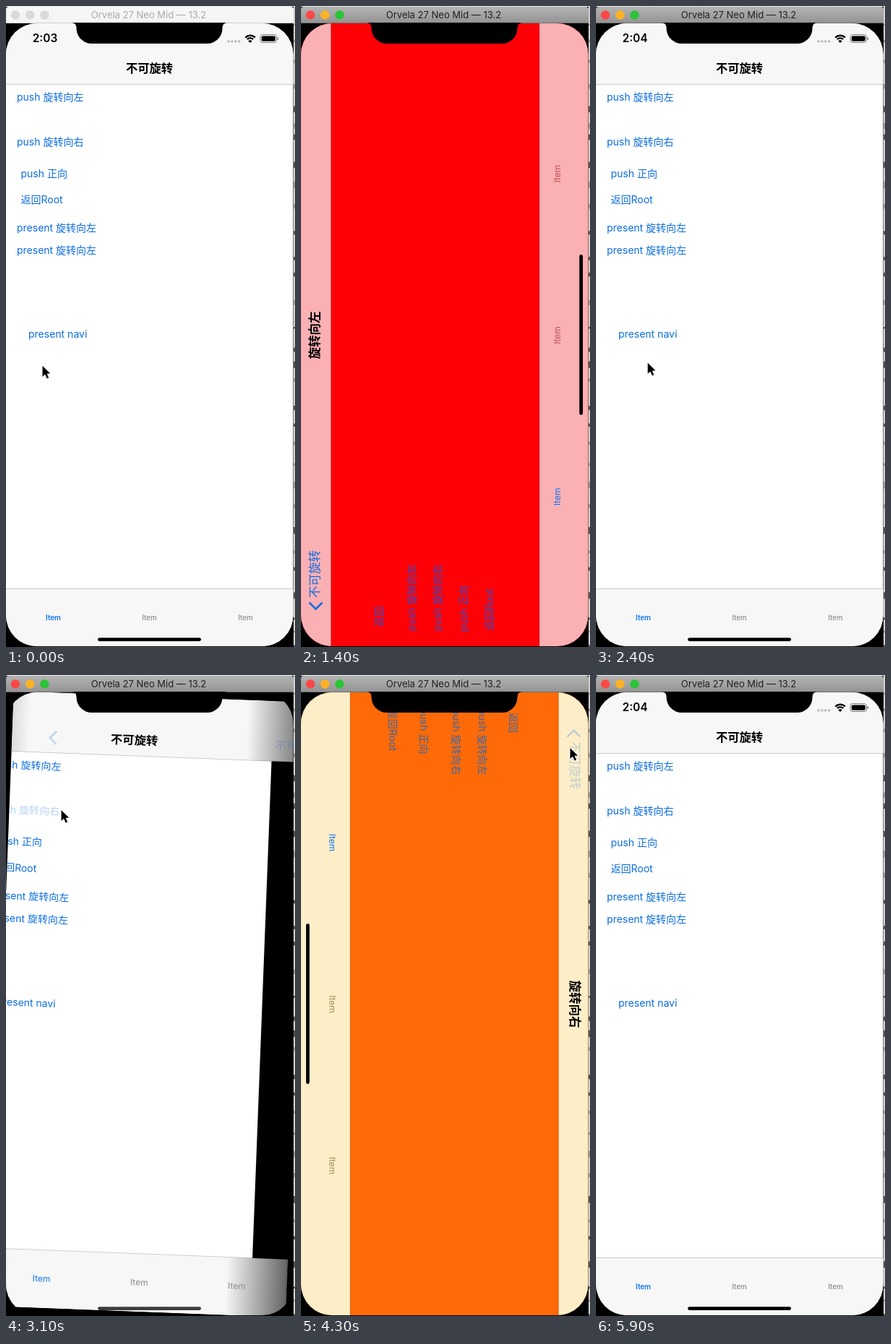
Write an HTML page with a canvas that moves like this. It is 400 px wide and 887 px high and loops after 6000 ms.

```html
<!DOCTYPE html>
<html lang="zh">
<head>
<meta charset="utf-8">
<title>Rotation demo</title>
<style>
html, body { margin: 0; width: 100%; height: 100%; overflow: hidden; background: #000; }
canvas { display: block; width: 400px; height: 887px; }
</style>
</head>
<body>
<canvas id="stage"></canvas>
<script>
const canvas = document.getElementById('stage');
const ctx = canvas.getContext('2d');
const dpr = window.devicePixelRatio || 1;
canvas.width = 400 * dpr;
canvas.height = 887 * dpr;

const LOOP = 6000, STEP = 100;
const SHORT = 398, LONG = 863, CX = 199, CY = 455.5;
const FONT = 'Inter, "Noto Sans CJK SC", "Noto Sans CJK", sans-serif';
const BLUE = '#0b6de2', LIGHT_BAR = '#f7f7f7';

const clamp = v => Math.max(0, Math.min(1, v));
const lerp = (a, b, k) => a + (b - a) * k;
const easeInOut = u => (1 - Math.cos(Math.PI * u)) / 2;
const easeOut = u => 1 - (1 - u) ** 1.5;

// Link entries: label, x from the left edge, y from the top edge
const rootLinks = [
  ['push 旋转向左', 15, 103], ['push 旋转向右', 15, 165],
  ['push 正向', 20.5, 208.5], ['返回Root', 20.5, 245],
  ['present 旋转向左', 15, 284], ['present 旋转向左', 15, 315],
  ['present navi', 31, 431]
];
const leftPage = {
  dir: -1, fill: '#fe0006', bar: '#fbb0b4', muted: '#bb5258', link: '#3a4cc4',
  title: '旋转向左',
  links: [['返回', 28, 109], ['push 旋转向左', 22, 154], ['push 旋转向右', 22, 190],
    ['push 正向', 21, 226], ['返回Root', 23, 262]]
};
const rightPage = {
  dir: 1, fill: '#ff6a08', bar: '#fdeec8', muted: '#a48a56', link: '#3d68a4',
  title: '旋转向右',
  links: [['返回', 28, 105], ['push 旋转向左', 22, 148], ['push 旋转向右', 22, 184],
    ['push 正向', 21, 229], ['返回Root', 23, 272]]
};

const visits = [
  { page: leftPage, link: 0, press: 600, push: 760, backPress: 1800, pop: 2000 },
  { page: rightPage, link: 1, press: 2900, push: 3060, backPress: 4300, pop: 4450 }
];
const PUSH_TIME = 400, POP_TIME = 380;

// Cursor stops: time, x, y of the tip
const cursorStops = [
  [0, 50, 498], [500, 55, 125], [900, 55, 125], [1300, 60, 420], [1700, 20, 790],
  [1900, 20, 790], [2100, 68, 689], [2800, 76, 187], [3200, 76, 187],
  [4100, 372, 101], [4400, 372, 101], [5600, 412, 300]
];

function text(str, x, y, size, color, { weight = 400, align = 'left', alpha = 1 } = {}) {
  ctx.save();
  ctx.globalAlpha *= alpha;
  ctx.font = `${weight} ${size}px ${FONT}`;
  ctx.textAlign = align;
  ctx.textBaseline = 'middle';
  ctx.fillStyle = color;
  ctx.fillText(str, x, y);
  ctx.restore();
}

function rect(x, y, w, h, color) {
  ctx.fillStyle = color;
  ctx.fillRect(x, y, w, h);
}

function pill(x, y, w, h, r, color) {
  ctx.fillStyle = color;
  ctx.beginPath();
  ctx.roundRect(x, y, w, h, r);
  ctx.fill();
}

function dot(x, y, r, color) {
  ctx.fillStyle = color;
  ctx.beginPath();
  ctx.arc(x, y, r, 0, 7);
  ctx.fill();
}

function chevron(x, y, alpha) {
  ctx.save();
  ctx.globalAlpha *= alpha;
  ctx.strokeStyle = BLUE;
  ctx.lineWidth = 2.5;
  ctx.beginPath();
  ctx.moveTo(x + 4.5, y - 9);
  ctx.lineTo(x - 4.5, y);
  ctx.lineTo(x + 4.5, y + 9);
  ctx.stroke();
  ctx.restore();
}

// Translucent bars pick up whatever lies behind them
function barFill(width, rootEnd, pageStart, page) {
  if (!page) return LIGHT_BAR;
  if (pageStart <= 0) return page.bar;
  const gradient = ctx.createLinearGradient(0, 0, width, 0);
  const stop = (x, color) => gradient.addColorStop(clamp(x / width), color);
  if (rootEnd < pageStart) {
    stop(0, '#dcdcdc');
    stop(24, LIGHT_BAR);
    stop(rootEnd - 35, LIGHT_BAR);
    stop(rootEnd + 45, '#6c6c6c');
    stop(pageStart - 30, '#5a5a5a');
  } else {
    stop(0, LIGHT_BAR);
    stop(pageStart - 25, LIGHT_BAR);
  }
  stop(pageStart + 30, page.bar);
  return gradient;
}

// turn: rotation progress; slide: push progress
function drawContainer(turn, slide, page, pressed, backPressed) {
  const w = lerp(SHORT, LONG, turn), h = lerp(LONG, SHORT, turn);
  const navH = lerp(84.5, 41.5, turn), tabH = lerp(80.5, 68, turn);
  const rootX = -0.3 * LONG * slide;
  const pageX = LONG * (1 - slide);
  const moving = turn > 0 && turn < 1;

  ctx.save();
  ctx.translate(CX, CY);
  if (page) ctx.rotate(page.dir * turn * Math.PI / 2);
  ctx.translate(-w / 2, -h / 2);
  ctx.beginPath();
  ctx.roundRect(0, 0, w, h, moving ? 12 : 0);
  ctx.clip();

  rect(0, 0, w, h, '#000');
  if (slide < 1) {
    rect(rootX, 0, SHORT, h, '#fff');
    rootLinks.forEach(([label, x, y], i) =>
      text(label, rootX + x, y, 14, BLUE, { alpha: i === pressed ? 0.3 : 1 }));
  }
  if (page) {
    rect(pageX, 0, LONG, h, page.fill);
    for (const [label, x, y] of page.links) text(label, pageX + x, y, 14, page.link);
  }

  const fill = barFill(w, rootX + SHORT, pageX, page);
  rect(0, 0, w, navH, fill);
  rect(0, h - tabH, w, tabH, fill);
  rect(0, navH - 0.5, w, 0.8, 'rgba(0,0,0,.24)');
  rect(0, h - tabH - 0.5, w, 0.8, 'rgba(0,0,0,.24)');

  const navY = navH - 21;
  const oldAlpha = 1 - clamp((slide - 0.15) / 0.4);
  text('不可旋转', SHORT / 2 - 0.5 - 200 * slide, navY, 16.3, '#000',
    { weight: 600, align: 'center', alpha: oldAlpha });
  if (page) {
    const alpha = backPressed ? 0.25 : clamp(0.1 + slide);
    chevron(57, navY, alpha);
    text('不可旋转', lerp(414, 68, slide), navY, 16.5, BLUE, { alpha });
    text(page.title, LONG / 2 * (2 - slide), navY, 16.5, '#000',
      { weight: 600, align: 'center', alpha: slide });
  }

  const gap = lerp(133, 223.5, turn), itemY = h - lerp(40, 42.5, turn);
  const muted = page && slide > 0.5 ? page.muted : '#8c8c8c';
  for (let i = -1; i <= 1; i++) {
    text('Item', w / 2 + i * gap - (page ? 0 : 0.5), itemY, page ? 12 : 9.8,
      i < 0 ? '#0b72f2' : muted, { weight: page ? 400 : i < 0 ? 600 : 500, align: 'center' });
  }
  ctx.restore();
}

function drawStatus(clock) {
  text(clock, 54, 45.5, 15.4, '#000', { weight: 600, align: 'center' });
  for (let i = 0; i < 4; i++) dot(308 + i * 4.9, 49, 1.8, '#b9b9b9');
  ctx.strokeStyle = '#000';
  ctx.lineWidth = 2.4;
  for (const r of [9.3, 5.6]) {
    ctx.beginPath();
    ctx.arc(338, 50, r, -Math.PI * 0.76, -Math.PI * 0.24);
    ctx.stroke();
  }
  ctx.fillStyle = '#000';
  ctx.beginPath();
  ctx.moveTo(338, 51);
  ctx.arc(338, 51, 3.6, -Math.PI * 0.77, -Math.PI * 0.23);
  ctx.fill();
  ctx.lineWidth = 1;
  ctx.strokeStyle = '#777';
  ctx.beginPath();
  ctx.roundRect(352, 39.7, 22.5, 10.8, 3);
  ctx.stroke();
  pill(353.7, 41.4, 19.1, 7.4, 1.8, '#000');
  pill(375.6, 43.3, 1.4, 3.8, 0.7, '#777');
}

function drawNotch() {
  ctx.fillStyle = '#000';
  ctx.beginPath();
  ctx.moveTo(91, 23);
  ctx.quadraticCurveTo(97.5, 24, 97.5, 30);
  ctx.arcTo(97.5, 52, 120, 52, 21);
  ctx.arcTo(299.5, 52, 299.5, 30, 21);
  ctx.lineTo(299.5, 30);
  ctx.quadraticCurveTo(299.5, 24, 306, 23);
  ctx.fill();
}

function drawIndicators(bottom, side, dir) {
  ctx.save();
  ctx.globalAlpha = bottom;
  pill(127, 874.2, 143, 4.8, 2.4, '#000');
  ctx.globalAlpha = side;
  pill(dir < 0 ? 385.3 : 7, 344, 4.8, 222, 2.4, '#000');
  ctx.restore();
}

function drawTitleBar(active) {
  rect(0, 0, 400, 1, '#e9e9e9');
  const gradient = ctx.createLinearGradient(0, 1, 0, 24);
  gradient.addColorStop(0, active ? '#b4b4b4' : '#f7f7f7');
  gradient.addColorStop(1, active ? '#929292' : '#f4f4f4');
  ctx.fillStyle = gradient;
  ctx.beginPath();
  ctx.roundRect(0, 1, 398, 23, [4, 4, 0, 0]);
  ctx.fill();
  rect(0, 23, 398, 1, active ? '#6e6e6e' : '#d0d0d0');
  const lights = active ? ['#fc4846', '#fdb226', '#2bc437'] : ['#dadada', '#dadada', '#dadada'];
  lights.forEach((color, i) => dot(13 + i * 20.2, 12.5, 6.2, color));
  text('Orvela 27 Neo Mid — 13.2', 197.5, 13, 13, active ? '#202020' : '#aaa', { align: 'center' });
}

function drawDesktopEdge() {
  rect(398, 0, 2, 887, '#d2d0cc');
  let seed = 7;
  const random = () => (seed = seed * 16807 % 2147483647) / 2147483647;
  for (let y = 25; y < 887; y += 14 + random() * 26) {
    rect(398, y, 2, 2 + random() * 8, random() < 0.5 ? '#55534f' : '#9a9892');
  }
}

function drawCursor(t) {
  if (t > 5600 || (t > 1300 && t < 1500)) return;
  const i = cursorStops.findIndex(stop => stop[0] >= t);
  const b = cursorStops[i], a = cursorStops[Math.max(0, i - 1)];
  const k = b === a ? 0 : easeInOut((t - a[0]) / (b[0] - a[0]));
  ctx.save();
  ctx.translate(lerp(a[1], b[1], k), lerp(a[2], b[2], k));
  ctx.beginPath();
  [[0.5, 0], [0.5, 15], [4, 11.8], [6.7, 17.6], [9.2, 16.5], [6.6, 10.8], [11.2, 10.6]]
    .forEach(([x, y]) => ctx.lineTo(x, y));
  ctx.closePath();
  ctx.lineWidth = 2;
  ctx.lineJoin = 'round';
  ctx.strokeStyle = '#fff';
  ctx.stroke();
  ctx.fillStyle = '#000';
  ctx.fill();
  ctx.restore();
}

function draw(t) {
  const visit = visits.find(v => t >= v.press && t < v.pop + POP_TIME);
  const page = visit && visit.page;
  const pushing = visit ? clamp((t - visit.push) / PUSH_TIME) : 0;
  const popping = visit ? clamp((t - visit.pop) / POP_TIME) : 0;
  const atRoot = pushing === 0 || popping > 0;

  ctx.setTransform(dpr, 0, 0, dpr, 0, 0);
  rect(0, 0, 400, 887, '#000');
  drawDesktopEdge();
  drawTitleBar(t >= 600);

  ctx.save();
  ctx.beginPath();
  ctx.roundRect(0, 24, 397.5, 862, 43);
  ctx.clip();
  if (atRoot) drawContainer(0, 0, null, pushing === 0 && visit ? visit.link : -1);
  if (pushing > 0) {
    ctx.save();
    ctx.translate(page.dir * SHORT * easeOut(popping), 0);
    drawContainer(easeInOut(pushing), easeOut(pushing), page, visit.link,
      t >= visit.backPress && popping === 0);
    ctx.restore();
  }
  if (atRoot) drawStatus(t < 760 ? '2:03' : '2:04');
  if (popping > 0) drawIndicators(clamp(popping * 2 - 1), clamp(1 - popping * 2.2), page.dir);
  else drawIndicators(clamp(1 - pushing * 2.5), clamp(pushing * 2 - 1), page ? page.dir : 1);
  ctx.restore();

  drawNotch();
  drawCursor(t);
}

function frame() {
  const t = performance.now() % LOOP;
  draw(Math.floor(t / STEP) * STEP);
  requestAnimationFrame(frame);
}
frame();
</script>
</body>
</html>
```
